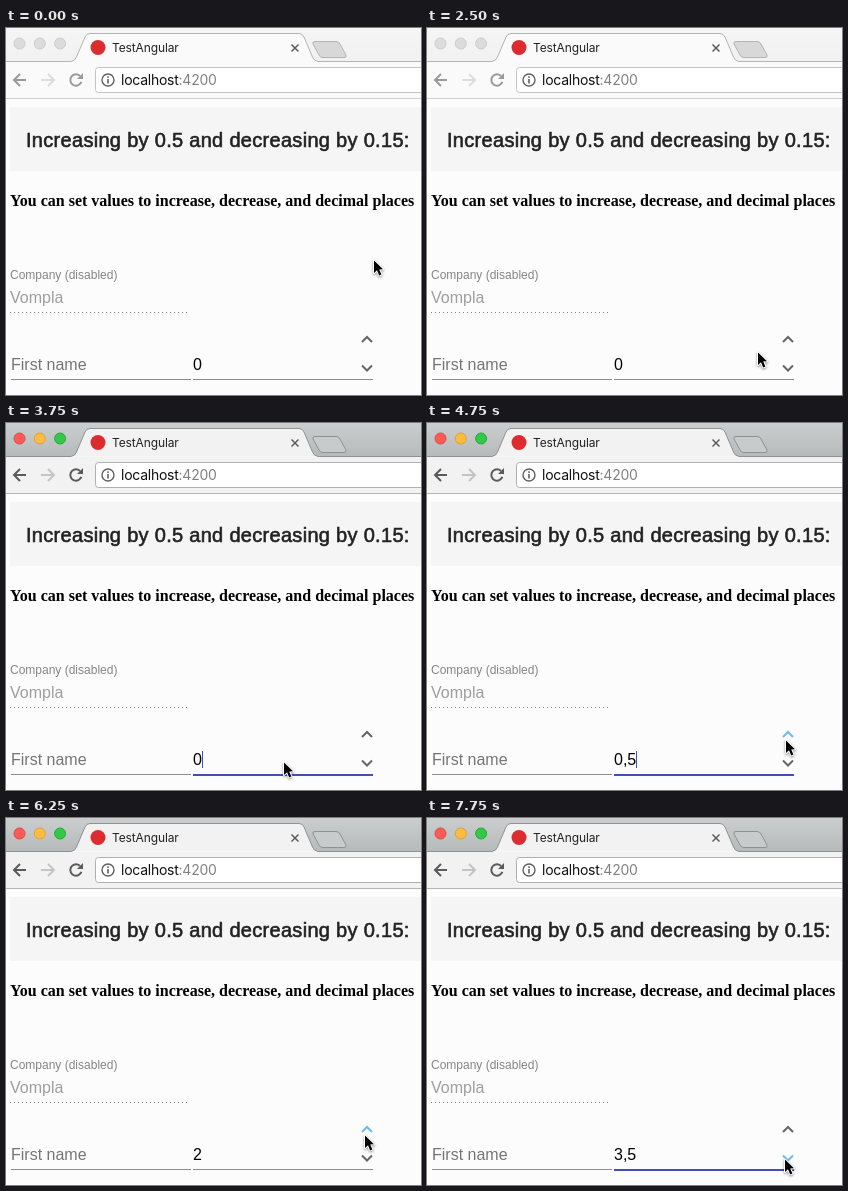
Write an HTML page with a canvas that moves like this. It is 415 px wide and 367 px high and loops after 8000 ms.

```html
<!DOCTYPE html>
<html lang="en">
<head>
<meta charset="utf-8">
<title>Number stepper</title>
<style>
  html, body { margin: 0; width: 100%; height: 100%; overflow: hidden; background: #fcfcfc; }
  canvas { display: block; }
</style>
</head>
<body>
<canvas id="stage" width="415" height="367"></canvas>
<script>
const ctx = document.getElementById('stage').getContext('2d');
const W = 415, H = 367, STEP = 250, LOOP = 8000;
const SANS = '"Liberation Sans", Arial, sans-serif';
const SERIF = '"Liberation Serif", "Times New Roman", serif';
const SYSTEM = 'Inter, sans-serif';
const INDIGO = '#3f51b5', HOVER = '#6fb9f2', CHEVRON = '#666';

// [step, x, y] of the pointer tip
const POINTER = [
  [0, 367, 231], [1, 350, 252], [2, 280, 280], [3, 185, 284], [4, 134, 250], [5, 163, 199],
  [6, 200, 235], [7, 240, 285], [8, 275, 330], [9, 308, 342], [10, 330, 323],
  [13, 277, 338], [15, 277, 338], [18, 358, 316], [29, 358, 316], [30, 358, 326], [31, 357, 340]
];

// [step, value, focused, caret]
const FIELD = [
  [0, 0, false, false], [13, 0, true, true], [18, 0.5, false, false], [19, 0.5, true, true],
  [21, 1, false, false], [22, 1, true, true], [23, 1.5, false, false], [24, 1.5, true, true],
  [25, 2, false, false], [26, 2, true, true], [27, 2.5, true, true], [28, 3, true, true],
  [29, 3.5, false, false], [30, 3.5, true, true], [31, 3.5, true, false]
];

function rect(x, y, w, h, fill) {
  ctx.fillStyle = fill;
  ctx.fillRect(x, y, w, h);
}

function path(points, closed) {
  ctx.beginPath();
  points.forEach(([x, y]) => ctx.lineTo(x, y));
  if (closed) ctx.closePath();
}

function line(points, color, width = 1) {
  path(points);
  ctx.strokeStyle = color;
  ctx.lineWidth = width;
  ctx.stroke();
}

function circle(x, y, r, fill, stroke, width = 1) {
  ctx.beginPath();
  ctx.arc(x, y, r, 0, Math.PI * 2);
  if (fill) {
    ctx.fillStyle = fill;
    ctx.fill();
  }
  if (stroke) {
    ctx.strokeStyle = stroke;
    ctx.lineWidth = width;
    ctx.stroke();
  }
}

function text(str, x, y, size, color, { family = SANS, weight = 'normal', spacing = 0, outline = 0 } = {}) {
  ctx.font = `${weight} ${size}px ${family}`;
  ctx.letterSpacing = `${spacing}px`;
  ctx.fillStyle = ctx.strokeStyle = color;
  ctx.fillText(str, x, y);
  if (outline) {
    ctx.lineWidth = outline;
    ctx.strokeText(str, x, y);
  }
  return ctx.measureText(str).width;
}

function tabStrip(active) {
  const shade = ctx.createLinearGradient(0, 0, 0, 33);
  shade.addColorStop(0, active ? '#cbcece' : '#f5f5f5');
  shade.addColorStop(1, active ? '#b7baba' : '#f1f1f1');
  rect(0, 0, W, 33, shade);

  const edge = active ? '#8f9292' : '#b4b4b4';
  const lights = active ? ['#fc5b57', '#fdbc40', '#34c84a'] : ['#dcdcdc', '#dcdcdc', '#dcdcdc'];
  const rims = active ? ['#df4744', '#dea034', '#27aa35'] : ['#cccccc', '#cccccc', '#cccccc'];
  lights.forEach((color, i) => circle(13.5 + i * 20.3, 15.5, 5.5, color, rims[i]));

  ctx.beginPath();
  ctx.moveTo(0, 33.5);
  ctx.lineTo(65, 33.5);
  ctx.quadraticCurveTo(69, 33, 70.5, 29);
  ctx.lineTo(79, 9);
  ctx.quadraticCurveTo(80.5, 5.5, 84, 5.5);
  ctx.lineTo(293, 5.5);
  ctx.quadraticCurveTo(296.5, 5.5, 298, 9);
  ctx.lineTo(306.5, 29);
  ctx.quadraticCurveTo(308, 33, 312, 33.5);
  ctx.lineTo(W, 33.5);
  ctx.fillStyle = active ? '#f2f2f2' : '#fafafa';
  ctx.fill();
  ctx.strokeStyle = edge;
  ctx.lineWidth = 1;
  ctx.stroke();

  ctx.beginPath();
  ctx.moveTo(309, 13.5);
  ctx.lineTo(330, 13.5);
  ctx.quadraticCurveTo(333, 13.5, 334, 16);
  ctx.lineTo(340, 27);
  ctx.quadraticCurveTo(341, 29.5, 338, 29.5);
  ctx.lineTo(317, 29.5);
  ctx.quadraticCurveTo(314, 29.5, 313, 27);
  ctx.lineTo(307, 16);
  ctx.quadraticCurveTo(306, 13.5, 309, 13.5);
  ctx.fillStyle = active ? '#c8cbcb' : '#d8d8d8';
  ctx.fill();
  ctx.stroke();

  circle(92, 19.5, 7.5, '#dd2c2f');
  text('TestAngular', 106, 24, 12, '#222', { family: SYSTEM, spacing: -0.12 });
  line([[285.5, 16.5], [292.5, 23.5]], '#5a5a5a', 1.5);
  line([[292.5, 16.5], [285.5, 23.5]], '#5a5a5a', 1.5);
}

function toolbar(active) {
  rect(0, 34, W, 37, active ? '#f2f2f2' : '#fafafa');
  rect(0, 70, W, 1, active ? '#b5b5b5' : '#cfcfcf');

  const ink = active ? '#5a5a5a' : '#9a9a9a';
  const faint = active ? '#c4c4c4' : '#dcdcdc';
  line([[20, 52], [8, 52]], ink, 2);
  line([[14, 46], [8, 52], [14, 58]], ink, 2);
  line([[35, 52], [47, 52]], faint, 2);
  line([[42, 46], [48, 52], [42, 58]], faint, 2);

  ctx.beginPath();
  ctx.arc(70, 52, 5.7, 0.35, Math.PI * 1.75);
  ctx.strokeStyle = ink;
  ctx.lineWidth = 2;
  ctx.stroke();
  path([[77, 45], [77, 51], [71, 51]], true);
  ctx.fillStyle = ink;
  ctx.fill();

  ctx.beginPath();
  ctx.roundRect(89.5, 39.5, 340, 25, 3);
  ctx.fillStyle = '#fff';
  ctx.fill();
  ctx.strokeStyle = active ? '#b0b0b0' : '#c4c4c4';
  ctx.lineWidth = 1;
  ctx.stroke();

  circle(102, 52, 6, null, '#606060', 1.4);
  rect(101.2, 48.3, 1.6, 1.6, '#606060');
  rect(101.2, 51, 1.6, 4.5, '#606060');
  const style = { family: SYSTEM, spacing: -0.25 };
  const w = text('localhost', 115, 57, 14, '#111', style);
  text(':4200', 115 + w, 57, 14, '#808080', style);
}

function page() {
  rect(4, 79, W - 4, 64, '#f5f5f5');
  text('Increasing by 0.5 and decreasing by 0.15:', 20, 119, 20, '#222', { spacing: 0.3, outline: 0.6 });
  text('You can set values to increase, decrease, and decimal places', 4, 178, 16, '#000',
    { family: SERIF, weight: 'bold' });

  text('Company (disabled)', 4, 251, 12, '#858585');
  text('Vompla', 4, 275, 16, '#9e9e9e');
  for (let x = 4; x < 183; x += 4) rect(x, 284, 1, 1, '#808080');

  text('First name', 5, 342, 16, '#757575');
  rect(5, 351, 180, 1, '#8c8c8c');
}

function chevron(y, dir, color) {
  line([[356, y - 2.5 * dir], [361, y + 2.5 * dir], [366, y - 2.5 * dir]], color, 2);
}

function stepper(step) {
  const [, value, focused, caret] = FIELD.filter(([start]) => start <= step).pop();
  const w = text(String(value).replace('.', ','), 187, 342, 16, '#000');
  if (caret) rect(Math.round(187 + w), 328, 1, 17, INDIGO);
  if (focused) rect(187, 351, 180, 2, INDIGO);
  else rect(187, 351, 180, 1, '#8c8c8c');
  chevron(311.5, -1, step >= 18 && step < 30 ? HOVER : CHEVRON);
  chevron(340, 1, step >= 31 ? HOVER : CHEVRON);
}

function pointer(step) {
  const next = POINTER.findIndex(([at]) => at >= step);
  const [t1, x1, y1] = POINTER[next];
  const [t0, x0, y0] = POINTER[Math.max(0, next - 1)];
  const k = t1 > t0 ? (step - t0) / (t1 - t0) : 1;

  ctx.save();
  ctx.translate(x0 + (x1 - x0) * k, y0 + (y1 - y0) * k);
  path([[1, 1.5], [1, 14], [4, 11.3], [6.2, 16.4], [8.4, 15.5], [6.2, 10.5], [10, 10.3]], true);
  ctx.lineJoin = 'round';
  ctx.strokeStyle = '#fff';
  ctx.lineWidth = 2;
  ctx.shadowColor = 'rgba(0, 0, 0, 0.45)';
  ctx.shadowBlur = 2.5;
  ctx.shadowOffsetY = 1;
  ctx.stroke();
  ctx.shadowColor = 'transparent';
  ctx.fillStyle = '#000';
  ctx.fill();
  ctx.restore();
}

function draw(now) {
  const step = Math.floor((now % LOOP) / STEP);
  const active = step >= 13;
  rect(0, 0, W, H, '#fcfcfc');
  tabStrip(active);
  toolbar(active);
  page();
  stepper(step);
  pointer(step);
}

const start = performance.now();
function tick() {
  draw(performance.now() - start);
  requestAnimationFrame(tick);
}
tick();
</script>
</body>
</html>
```
